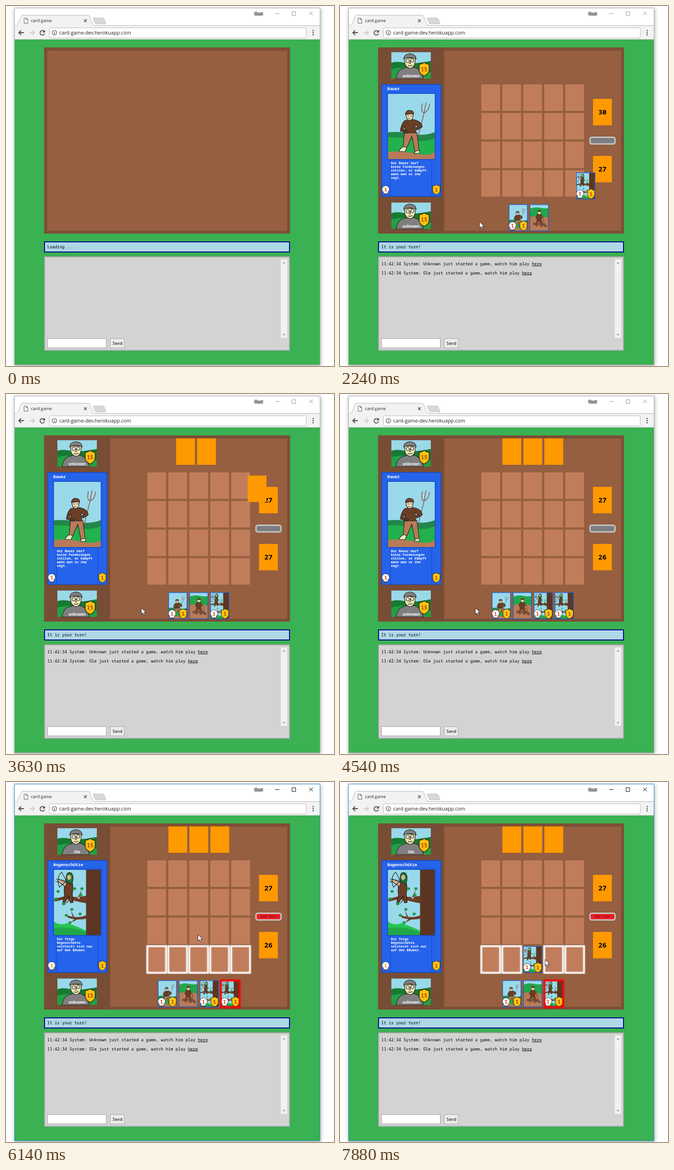
An HTML page that plays this animation: 715x783 px, repeating every 8000 ms.

```html
<!DOCTYPE html>
<html lang="en">
<head>
<meta charset="utf-8">
<title>card game</title>
<style>
html, body { margin: 0; width: 100%; height: 100%; overflow: hidden; background: #fff; }
svg { display: block; width: 715px; height: 783px; }
text { font-family: "Noto Sans Mono", monospace; white-space: pre; }
.ui { font-family: "Open Sans", "Noto Sans", sans-serif; }
.b { font-weight: 700; }
.mid { text-anchor: middle; }
.ink { fill: none; stroke: #222; stroke-width: 1.2; }
</style>
</head>
<body>
<svg id="stage" viewBox="0 0 715 783" xmlns="http://www.w3.org/2000/svg"></svg>
<script>
const LOOP = 8000;
const FLY = 490;            // length of one card flight
const STEP = 45.75;         // column pitch
const JOIN = 50, START = 490, HOVER = 1600, READY = 4600;
const PICK = 5440, PLACE = 6530, PLAY = 6585, PICK2 = 7480;
const DRAWS = [1049, 1560, 2073, 4015];
const RIVAL_DRAWS = [2514, 3015, 3517];
const FACES = ['farmer', 'field', 'archer', 'archer'];
const PATH = [
  [50, 621, 760], [210, 605, 738], [490, 605, 738], [900, 480, 540], [1290, 444, 463],
  [1340, 444, 463], [1600, 416, 468], [1850, 362, 479], [2110, 305, 470], [2240, 304, 469],
  [2500, 293, 468], [3630, 295, 465], [4590, 295, 465], [5090, 453, 461], [5210, 477, 462],
  [5440, 477, 462], [5820, 418, 321], [6080, 418, 321], [6370, 420, 372], [6560, 420, 372],
  [6850, 440, 449], [7100, 448, 459], [7280, 448, 459], [7320, 453, 459], [7480, 453, 459],
  [7820, 447, 386], [8000, 447, 386]
];

const rect = (x, y, w, h, fill, more = '') =>
  `<rect x="${x}" y="${y}" width="${w}" height="${h}" fill="${fill}" ${more}/>`;
const path = (d, fill, more = '') => `<path d="${d}" fill="${fill}" ${more}/>`;
const ink = (d, more = '') => path(d, 'none', `class="ink" ${more}`);
const text = (x, y, s, size, more = '') =>
  `<text x="${x}" y="${y}" font-size="${size}" ${more}>${s}</text>`;
const group = (id, body, more = '') => `<g id="${id}" ${more}>${body}</g>`;
const use = (id, x, y, more = '') => `<use href="#${id}" transform="translate(${x} ${y})" ${more}/>`;
const OUT = 'stroke="#222" stroke-width="1.2" stroke-linejoin="round"';

// Pictures, 104 x 144
const farmer =
  rect(0, 0, 104, 144, '#99d9ea') +
  path('M0 85Q25 82 52 88T104 84V144H0Z', '#23864a') +
  path('M0 96Q30 94 55 101T104 97V144H0Z', '#22b14c') +
  path('M0 128Q30 124 60 131T104 127V144H0Z', '#b97a57') +
  ink('M58 130L80 42M76 22Q72 42 80 42Q89 40 92 23M84 20L80 42', 'style="stroke:#8a5a50;stroke-width:1.6"') +
  path('M37 86L34 117L42 119L53 93L60 127L69 125L64 85Z', '#b97a57', OUT) +
  path('M35 116Q28 119 25 126L38 127L42 118ZM60 126L59 131L71 130L69 124Z', '#efe4c8', OUT) +
  path('M38 59L57 57Q74 60 76 73L64 80L62 75L67 72L60 69L62 86L37 86L39 71L34 78L46 83L43 87L28 82Q30 66 38 59Z', '#6b3d24', OUT) +
  path('M40 46Q41 59 49 59Q56 58 56 44Z', '#efd9b4', OUT) +
  path('M39 46Q40 36 50 37Q58 38 57 46Q48 42 39 46Z', '#7a4528', OUT) +
  ink('M43 49h4M50 49h4M45 55h5');
const leaves = [[10, 48], [22, 75], [46, 42], [62, 42], [28, 100], [40, 87], [58, 97], [36, 116], [60, 56], [6, 64]]
  .map(([x, y]) => `<ellipse cx="${x}" cy="${y}" rx="3.5" ry="3" fill="#1f9a47"/>`).join('');
const archer =
  rect(0, 0, 104, 144, '#99d9ea') +
  path('M0 112Q12 124 30 117Q55 125 72 134V144H0Z', '#25c552') +
  path('M0 128Q35 122 75 138V144H0Z', '#22a64a') +
  rect(71, 0, 33, 144, '#5c3622') +
  path('M73 57Q52 62 38 59T0 66L4 70Q27 63 41 67T73 74ZM73 99Q55 108 29 100L31 105Q52 112 73 107ZM40 63L24 78L27 74L38 60ZM52 62L62 45L56 65ZM42 104L38 89L45 103ZM48 106L38 116L54 108Z', '#6b3d24') +
  path('M25 27Q22 42 24 57L20 73L25 73L33 57L37 73L43 72L41 53Q44 39 41 29Z', '#6b3d24', OUT) +
  path('M28 14Q30 4 39 8Q46 15 40 33L33 28L27 27Z', '#1d7638', OUT) +
  path('M30 14Q36 9 39 17Q38 23 33 23Q29 21 30 14Z', '#d8b48c') +
  path('M29 29L11 21L9 25L26 38Z', '#d8b48c', OUT) +
  ink('M18 6Q5 17 13 39L28 25L18 6M5 21L29 25M4 26L10 28') + leaves;
const field =
  rect(0, 0, 104, 144, '#99d9ea') +
  path('M0 24Q28 12 52 18T104 20V144H0Z', '#22a64a') +
  path('M0 69Q52 58 104 73V144H0Z', '#b97a57') +
  path('M43 78L31 108L37 110L51 90L66 112L72 108L62 77Z', '#7a4528', OUT) +
  path('M42 52L62 50L70 73L61 77L63 86L42 86L32 71Z', '#6b3d24', OUT) +
  '<ellipse cx="53" cy="43" rx="8" ry="10" fill="#efd9b4" class="x"/>' +
  path('M43 40Q45 28 56 31Q63 33 62 41Z', '#7a4528', OUT) +
  ink('M72 57L79 108', 'style="stroke:#7a4528;stroke-width:3"') +
  [[25, 106], [38, 113], [52, 106], [64, 116], [78, 109], [87, 117]].map(([x, y]) =>
    `<ellipse cx="${x}" cy="${y}" rx="7" ry="5" fill="#8d5537" ${OUT}/>`).join('');

const skull = path('M-8 0A8 8 0 1 1 8 0Q8 4 5 5L5 10H-5L-5 5Q-8 4-8 0Z', '#fff', 'stroke="#222" stroke-width=".8"') +
  ink('M-3 8v3M0 8v3M3 8v3');
const shield = path('M0-11Q4-8 8-8L8 2Q7 8 0 11Q-7 8-8 2L-8-8Q-4-8 0-11Z', '#ffc20e', 'stroke="#222" stroke-width="1"');
const one = (x, y, fill = '#d5421c') => text(x, y, 1, 11, `class="b mid" fill="${fill}"`);

const smallCard = name => group(name,
  `<use href="#${name}Art" transform="scale(.394 .4)"/>` +
  rect(.5, .5, 40, 57, 'none', 'stroke="#2458c8" stroke-width="1.4"') +
  (name === 'field' ? '' :
    use('skull', 8, 46) + use('shield', 32, 46.5) + one(8, 50) + one(32, 50.5, '#a8440f')));

const avatar = rect(0, 0, 86, 57.5, '#99d9ea') +
  path('M0 23Q12 19 28 23T86 19V57.5H0Z', '#177a33') +
  path('M0 37Q18 32 38 34T86 44V57.5H0Z', '#22a045') +
  path('M10 57Q14 39 24 36L36 32L51 33Q65 38 70 57.5H10Z', '#7f7f7f', OUT) +
  path('M29 13Q27 33 41 35Q53 33 52 13Z', '#efe4b0', OUT) +
  path('M27 15Q27 4 41 3Q54 5 54 15Q41 8 27 15Z', '#7f7f7f', OUT) +
  '<circle cx="35.500" cy="19" r="3.500" fill="#f7f1d8" class="eye"/><circle cx="45.500" cy="18.500" r="3.500" fill="#f7f1d8"/>' +
  ink('M32 19a3.500 3.500 0 1 0 7 0a3.500 3.500 0 1 0-7 0M42 18a3.500 3.500 0 1 0 7 0a3.500 3.500 0 1 0-7 0M41 18v7h-3M36 29Q41 31 46 28') +
  `<use href="#shield" transform="translate(71.500 37) scale(1.35)"/>` +
  text(71.5, 41, 15, 11.5, 'class="b mid" fill="#a8440f"');

const panel = (name, title, lines, skullInk) => group(name + 'Panel',
  rect(91, 171, 129, 243, '#2563ea', 'stroke="#184fce" stroke-width="2"') +
  ink('M110 335V414M200 335V414', 'style="stroke:#184fce;stroke-width:1.5"') +
  use(name + 'Art', 103.5, 190) +
  rect(103.5, 190, 104, 144, 'none', 'stroke="#184fce" stroke-width="2"') +
  text(103, 183, title, 9.05, 'class="b" fill="#fff"') +
  lines.map((s, i) => text(110.7, 343.5 + 8.1 * i, s, 7.2, 'class="b" fill="#fff"')).join('') +
  use('skull', 99.5, 399) + use('shield', 210, 399.5) +
  one(99.5, 403, skullInk) + one(210, 403.5, '#a8440f'));

const deck = (id, y) => rect(551.5, y, 41, 57.5, '#ff9900') +
  text(572, y + 33.5, 30, 15, `id="${id}" class="b mid"`);

const glow = (id, more = '') => group(id,
  rect(0, 0, 41, 58, 'none', 'stroke="#fff" stroke-width="4" filter="url(#soft)"') +
  rect(0, 0, 41, 58, 'none', 'stroke="#fff" stroke-width="1.5"'), more);

let cells = '', rowGlow = '';
for (let c = 0; c < 5; c++) {
  for (let r = 0; r < 4; r++) cells += rect(308 + c * STEP, 170.5 + r * 62.2, 41, 57.5, '#c17d5b');
  rowGlow += glow('cell' + c, `transform="translate(${308 + c * STEP} 357)"`);
}

const browser =
  rect(18.5, 4.5, 666, 776, '#fff', 'id="frame" stroke="#aaa" filter="url(#shade)"') +
  path('M19 42H24Q26 41 28 36L34 22Q35 20 37 20H179Q181 20 182 22L188 37Q190 42 192 42H684V72H19Z', '#f2f2f2') +
  ink('M19 42.500H23Q25 41 27 37L33 22Q34 20 36 20H179Q181 20 182 22L188 38Q190 42.500 193 42.500H684', 'style="stroke:#b4b4b4;stroke-width:1"') +
  path('M190 26H211Q213 26 214 28L218 39H197Q195 39 194 37Z', '#d8d8d8', 'stroke="#bbb"') +
  path('M39.500 26.500H44.500L47.500 29.500V37.500H39.500ZM44.500 26.500V29.500H47.500', '#fff', 'stroke="#555"') +
  text(54.5, 35.3, 'card game', 9.3, 'class="ui" fill="#222"') +
  ink('M170 29L176 35M176 29L170 35', 'style="stroke:#444;stroke-width:1.4"') +
  text(541, 20, 'Gast', 9, 'class="ui" fill="#eee" stroke="#555" stroke-width="1.6" paint-order="stroke"') +
  ink('M587 16.500H596M623.500 12.500H631.500V20.500H623.500ZM661 12L669 20M669 12L661 20', 'id="buttons" style="stroke-width:1"') +
  rect(19, 72, 665, 1, '#c4c4c4') +
  ink('M39 58H28.500M33 53L28 58L33 63', 'style="stroke:#444;stroke-width:1.8"') +
  ink('M51 58H61.500M57 53L62 58L57 63', 'style="stroke:#ccc;stroke-width:1.8"') +
  ink('M83 55A5 5 0 1 0 84 60', 'style="stroke:#444;stroke-width:1.8"') + path('M85 52V57.500H79.500Z', '#444') +
  rect(94.5, 47.5, 560, 22, '#fff', 'rx="2" stroke="#b8b8b8"') +
  '<circle cx="105.500" cy="58" r="5" class="ink" style="stroke:#555"/>' +
  rect(105, 57, 1.3, 4, '#444') + rect(105, 54.7, 1.3, 1.4, '#444') +
  text(116, 62, 'card-game-dev.herokuapp.com', 10.8, 'class="ui" fill="#222"') +
  [53.5, 58, 62.5].map(y => `<circle cx="669.500" cy="${y}" r="1.400" fill="#555"/>`).join('') +
  rect(19, 73, 665, 707, '#3ab153');

const says = (y, who) => text(90, y,
  `11:42:34 System: ${who} just started a game, watch him play <tspan text-decoration="underline">here</tspan>`, 8.97);

const page =
  rect(83, 90, 536, 405, '#7c4e36') + rect(90, 97, 523, 392, '#955f40') +
  rect(84, 513, 534, 22, '#add8e6', 'stroke="#000088" stroke-width="2"') +
  text(90, 527, '', 8.97, 'id="status"') +
  rect(84, 545.5, 534, 203.5, '#d3d3d3', 'stroke="#a4a4a4" stroke-width="2"') +
  group('log', says(564, 'Unknown') + says(583.5, 'Ole')) +
  rect(599, 551, 14, 171, '#f1f1f1') +
  path('M602.500 560L606 556.500L609.500 560ZM602.500 713.500L606 717L609.500 713.500Z', '#a3a3a3') +
  rect(90.5, 723.5, 128, 20, '#fff', 'stroke="#a0a0a0"') +
  rect(227.5, 723.5, 30, 20, '#ececec', 'stroke="#a8a8a8"') +
  text(232, 737, 'Send', 8.97);

const nameTag = 'class="ui b mid" fill="#fff"';
const game = group('game',
  rect(83, 90, 144, 405, '#784d35') +
  use('avatar', 112, 100.5) + use('avatar', 112, 427.5) +
  text(155, 154.5, '', 8, `id="rival" ${nameTag}`) + text(155, 481.5, 'unknown', 8, nameTag) +
  cells + rowGlow + deck('rivalDeck', 202) + deck('ownDeck', 326) +
  rect(545, 285.5, 54.5, 14.5, '#7d7d82', 'id="endBox" rx="4" stroke="#c6c6c6" stroke-width="3"') +
  text(572, 295.3, 'End Turn', 6.8, 'id="endText" class="mid" fill="#4a0a10"') +
  panel('farmer', 'Bauer', ['Der Bauer darf', 'keine Forderungen', 'stellen, er kämpft', 'wann man es ihm', 'sagt.']) +
  panel('archer', 'Bogenschütze', ['Der feige', 'Bogenschütze', 'versteckt sich nur', 'auf den Bäumen.'], '#ee8a1c') +
  RIVAL_DRAWS.map((_, i) => group('rival' + i, rect(0, 0, 41, 57.5, '#ff9900'))).join('') +
  FACES.map((f, i) => group('card' + i, `<use href="#${f}"/>` + glow('glow' + i))).join(''));

const cursor = group('cursor',
  path('M0 0V14L3.300 11L5.700 16.300L8 15.300L5.700 10.200H10Z', '#fff', 'stroke="#111" stroke-width=".9"'));

document.getElementById('stage').innerHTML =
  `<defs>
    <filter id="soft" x="-20%" y="-20%" width="140%" height="140%"><feGaussianBlur stdDeviation="1"/></filter>
    <filter id="shade" x="-5%" y="-5%" width="110%" height="110%"><feDropShadow dx="1" dy="2" stdDeviation="4" flood-opacity=".35"/></filter>
    ${group('skull', skull)}${group('shield', shield)}
    ${group('farmerArt', farmer)}${group('archerArt', archer)}${group('fieldArt', field)}
    ${smallCard('farmer')}${smallCard('archer')}${smallCard('field')}${group('avatar', avatar)}
  </defs>` + browser + page + game + cursor;

const $ = id => document.getElementById(id);
const show = (id, on) => $(id).setAttribute('display', on ? 'inline' : 'none');
const put = (id, x, y) => $(id).setAttribute('transform', `translate(${x.toFixed(2)} ${y.toFixed(2)})`);
const set = (id, name, value) => $(id).setAttribute(name, value);
const label = (id, s) => { if ($(id).textContent !== String(s)) $(id).textContent = s; };
const clamp = v => Math.max(0, Math.min(1, v));
const mix = (a, b, p) => a + (b - a) * p;
const flight = (t, start) => clamp((t - start) / FLY);
const slide = (t, start) => clamp(1.13 * flight(t, start));
const slot = (i, n) => 399.75 + (i - (n - 1) / 2) * STEP;

// A card flies from its deck; later draws push it along the hand.
function dealt(i, starts, t, deckY, handY) {
  const p = flight(t, starts[i]);
  let x = mix(551.5, slot(i, i + 1), p);
  for (let j = i + 1; j < starts.length; j++) x = mix(x, slot(i, j + 1), slide(t, starts[j]));
  return [x, mix(deckY, handY, p)];
}

function pointer(t) {
  let k = 0;
  while (k < PATH.length - 2 && t >= PATH[k + 1][0]) k++;
  const [a, b] = [PATH[k], PATH[k + 1]];
  const p = clamp((t - a[0]) / (b[0] - a[0]));
  return [mix(a[1], b[1], p), mix(a[2], b[2], p)];
}

function render(t) {
  const clock = t > 3680 && t < 3780 ? 3680 : t;   // short stall
  const mouse = pointer(t);
  const ready = t >= READY, active = t >= PICK;
  const onArcher = t >= READY && (active || mouse[0] >= 423);
  const picking = t >= PICK && t < PLACE, picking2 = t >= PICK2;
  const playable = (ready && t < PICK) || (t >= 7085 && t < PICK2);
  const left = starts => 30 - starts.filter(s => clock >= s).length;

  show('game', t >= JOIN);
  show('log', t >= START);
  label('status', t < START ? 'Loading ...' : 'It is your turn!');
  label('rival', ready ? 'Ole' : 'unknown');
  label('ownDeck', left(DRAWS));
  label('rivalDeck', left(RIVAL_DRAWS));
  show('farmerPanel', t >= HOVER && !onArcher);
  show('archerPanel', onArcher);
  set('endBox', 'fill', ready ? '#ed1c24' : '#7d7d82');
  show('endText', ready);
  set('frame', 'stroke', active ? '#2a8ad4' : '#aaa');
  $('buttons').style.stroke = active ? '#000' : '#999';

  RIVAL_DRAWS.forEach((s, i) => {
    show('rival' + i, clock >= s);
    put('rival' + i, ...dealt(i, RIVAL_DRAWS, clock, 202, 96.5));
  });

  DRAWS.forEach((s, i) => {
    let [x, y] = dealt(i, DRAWS, clock, 326, 431.5);
    if (i < 3) x = mix(x, slot(i, 3), slide(t, PLAY));
    else {
      const p = flight(t, PLAY);
      x = mix(x, 308 + 2 * STEP, p);
      y = mix(y, 357, p);
    }
    const chosen = (picking && i === 3) || (picking2 && i === 2);
    const lit = playable && i !== 1 && !(i === 3 && t > PLAY);
    show('card' + i, clock >= s);
    put('card' + i, x, y);
    show('glow' + i, chosen || lit);
    for (const r of $('glow' + i).children) r.setAttribute('stroke', chosen ? '#f00' : '#fff');
  });

  for (let c = 0; c < 5; c++) show('cell' + c, picking || (picking2 && c !== 2));
  show('cursor', t >= JOIN);
  put('cursor', ...mouse);
}

const began = performance.now();
function tick() {
  render((performance.now() - began) % LOOP);
  requestAnimationFrame(tick);
}
render(0);
requestAnimationFrame(tick);
</script>
</body>
</html>
```
